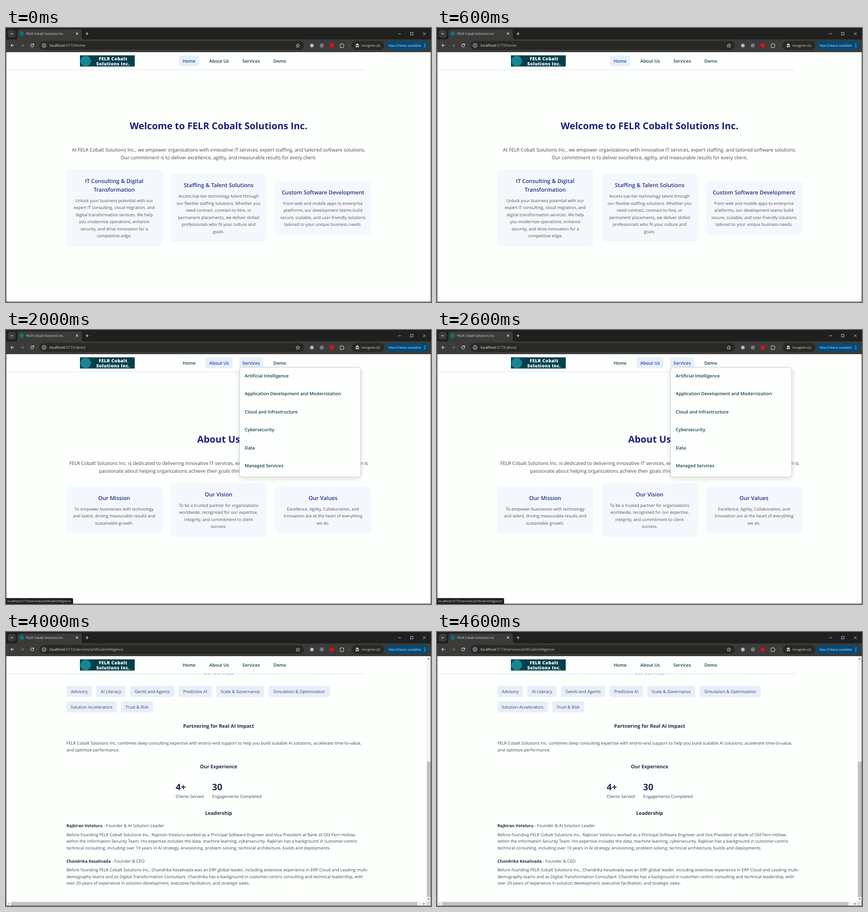
These frames come from a looping animation (931x601 px, 5 s). An HTML page with a canvas:

```html
<!DOCTYPE html>
<html lang="en">
<head>
<meta charset="utf-8">
<title>Site tour</title>
<style>
html, body { margin: 0; width: 100%; height: 100%; overflow: hidden; background: #fdfefd; }
canvas { display: block; width: 931px; height: 601px; }
</style>
</head>
<body>
<canvas id="stage"></canvas>
<script>
const W = 931, H = 601, STEP = 1000, SCENES = 5;
const FONT = '"Open Sans", "Noto Sans", sans-serif';
const BRAND = 'FELR Cobalt Solutions Inc.';
const INDIGO = '#1a1f7c', NAVY = '#1b2d45', BODY = '#444748', PAGE = '#fdfffd';
const MID = 465.7, SCROLL = 402;

const canvas = document.getElementById('stage');
const ctx = canvas.getContext('2d');
const dpr = window.devicePixelRatio || 1;
canvas.width = W * dpr;
canvas.height = H * dpr;

// Text is placed by the middle of its capitals; returns its width.
function text(str, x, y, size, color, { weight = 400, align = 'left', spacing = 0 } = {}) {
  ctx.font = `${weight} ${size}px ${FONT}`;
  ctx.textAlign = align;
  ctx.letterSpacing = spacing + 'px';
  ctx.fillStyle = color;
  ctx.fillText(str, x, y + size * 0.36);
  return ctx.measureText(str).width;
}

const centered = (str, x, y, size, color, weight) =>
  text(str, x, y, size, color, { weight, align: 'center' });

function lines(list, x, y, gap, size, color, align) {
  list.forEach((s, i) => text(s, x, y + i * gap, size, color, { align }));
}

function rect(x, y, w, h, color) {
  ctx.fillStyle = color;
  ctx.fillRect(x, y, w, h);
}

function round(x, y, w, h, r, color) {
  ctx.beginPath();
  ctx.roundRect(x, y, w, h, r);
  ctx.fillStyle = color;
  ctx.fill();
}

function disc(x, y, r, color) {
  ctx.beginPath();
  ctx.arc(x, y, r, 0, Math.PI * 2);
  ctx.fillStyle = color;
  ctx.fill();
}

function stroke(d, color, width = 1) {
  ctx.strokeStyle = color;
  ctx.lineWidth = width;
  ctx.stroke(new Path2D(d));
}

function shape(d, color) {
  ctx.fillStyle = color;
  ctx.fill(new Path2D(d));
}

function drawBrowser(path) {
  const light = '#dfe0dd';
  rect(0, 0, W, 53, '#20211f');
  rect(0, 25, W, 28, '#3b3c39');
  round(4, 4, 17, 17, 5, '#3b3c39');
  stroke('M10 11.3l2.5 2.5 2.5-2.5', light, 1.1);
  shape('M20 25q5 0 5-5V8q0-5 5-5h131q5 0 5 5v12q0 5 5 5z', '#3b3c39');
  disc(34.5, 12.5, 5, '#0e7080');
  text(BRAND, 44, 12.6, 6.95, light);
  stroke('M153.3 10l4.6 4.6m0-4.6l-4.6 4.6', light, 1.1);
  stroke('M174.2 12.5h6.8m-3.4-3.4v6.8', light, 1.1);
  stroke('M859 12.7h6M886 9.7h5.6v5.6h-5.6zM913.4 9.6l6 6m0-6l-6 6', light, 0.9);

  stroke('M17.8 38.3h-7m3.2-3.3l-3.3 3.3 3.3 3.3', light, 1.1);
  stroke('M32 38.3h7m-3.2-3.3l3.3 3.3-3.3 3.3', '#777875', 1.1);
  stroke('M60.3 36.6a3.3 3.3 0 1 0 .2 2.6M60.8 34.6v2.5h-2.5', light, 1.1);

  round(73, 28.5, 580, 19.5, 9.7, '#282927');
  disc(83.3, 38.3, 6.8, '#3b3c39');
  stroke('M79.5 38.3a3.8 3.8 0 1 0 7.6 0a3.8 3.8 0 1 0-7.6 0M83.3 37.8v2.5M83.3 36v1', light, 0.9);
  const host = text('localhost', 95.5, 38.3, 8, '#f2f3f0');
  text(':5173/' + path, 95.5 + host, 38.3, 8, '#c3c5c1');
  stroke('M639.3 34.4l1.2 2.8 3 .2-2.3 2 .8 3-2.7-1.7-2.7 1.7.8-3-2.3-2 3-.2z', light, 0.9);

  disc(670, 38.4, 4, '#9fc0cf');
  disc(691.8, 38.4, 4.6, '#777875');
  disc(713.5, 38.4, 4.8, '#e40d12');
  stroke('M731.8 35.3h2.4a1.3 1.3 0 0 1 2.6 0h2.4v2.5a1.3 1.3 0 0 1 0 2.6v2.3h-7.4v-2.4a1.4 1.4 0 0 0 0-2.6z', light, 1);
  rect(751, 34, 1, 9, '#5d5e5b');

  round(757, 28.5, 72, 19.5, 9.7, '#282927');
  shape('M766.8 37.2l1-3h3.6l1 3z', light);
  stroke('M765 37.8h9.2M769 40.6h1.2', light, 0.9);
  disc(767.6, 40.8, 1.6, light);
  disc(771.6, 40.8, 1.6, light);
  text('Incognito (2)', 778.7, 38.4, 7.1, light);

  round(832, 28.5, 94.5, 19.5, 9.7, '#064a75');
  text('New Orbeno available', 838, 38.4, 6.9, '#cfe8fa');
  for (let i = -1; i <= 1; i++) disc(917.5, 38.3 + i * 3.1, 0.9, '#cfe8fa');
}

const NAV = [
  ['Home', 401, 379, 44],
  ['About Us', 466.7, 437, 59],
  ['Services', 537, 511, 52.5],
  ['Demo', 599.8, 578, 44]
];

function drawNav(active) {
  rect(1, 53, 784, 39, PAGE);
  rect(1, 91.5, 784, 1, '#dfe2e2');
  rect(784.5, 53, 0.7, 39, '#f5f7f7');
  rect(162, 60, 120, 24.5, '#03404c');
  disc(174.5, 72.3, 11.5, '#178592');
  const [a, b, ...rest] = BRAND.split(' ');
  const mark = { weight: 800, align: 'center', spacing: 0.4 };
  text(a + ' ' + b, 234.5, 67.4, 9.8, '#fff', mark);
  text(rest.join(' '), 234.5, 78.8, 9.8, '#fff', mark);
  for (const [name, x, left, width] of NAV) {
    const on = active.includes(name);
    if (on) round(left, 60.3, width, 23, 4, '#e8eefa');
    centered(name, x, 72.6, 9.75, on ? '#1b4fa8' : '#123f50', 600);
  }
}

function drawMenu() {
  const items = ['Artificial Intelligence', 'Application Development and Modernization',
    'Cloud and Infrastructure', 'Cybersecurity', 'Data', 'Managed Services'];
  ctx.save();
  ctx.shadowColor = 'rgba(0,0,0,.14)';
  ctx.shadowBlur = 12 * dpr;
  ctx.shadowOffsetY = 3 * dpr;
  round(511.5, 82, 265.5, 240.5, 6, PAGE);
  ctx.restore();
  ctx.beginPath();
  ctx.roundRect(511.5, 82, 265.5, 240.5, 6);
  ctx.strokeStyle = '#c3c7c9';
  ctx.lineWidth = 0.9;
  ctx.stroke();
  items.forEach((s, i) => text(s, 523, 100.2 + i * 39.5, 9.75, '#123f50', { weight: 600 }));
}

function drawCard(i, heads, body) {
  const hGap = 18.7, pGap = 15.55;
  const x = 237 + i * 228.7;
  const h = 37.2 + heads.length * hGap + body.length * pGap;
  const top = 394.7 - h / 2;
  round(x - 105, top, 210.4, h, 7, '#f4f8fc');
  heads.forEach((s, k) => centered(s, x, top + 25 + k * hGap, 12.05, '#253089', 600));
  lines(body, x, top + 48.8 + (heads.length - 1) * hGap, pGap, 9.2, '#505456', 'center');
}

function drawHome() {
  centered('Welcome to ' + BRAND, MID, 214.8, 20.6, INDIGO, 700);
  lines([`At ${BRAND}, we empower organizations with innovative IT services, expert staffing, and tailored software solutions.`,
    'Our commitment is to deliver excellence, agility, and measurable results for every client.'],
    MID, 267.2, 16.6, 10.52, BODY, 'center');
  drawCard(0, ['IT Consulting & Digital', 'Transformation'],
    ['Unlock your business potential with our', 'expert IT consulting, cloud migration, and',
      'digital transformation services. We help', 'you modernize operations, enhance',
      'security, and drive innovation for a', 'competitive edge.']);
  drawCard(1, ['Staffing & Talent Solutions'],
    ['Access top-tier technology talent through', 'our flexible staffing solutions. Whether you',
      'need contract, contract-to-hire, or', 'permanent placements, we deliver skilled',
      'professionals who fit your culture and', 'goals.']);
  drawCard(2, ['Custom Software Development'],
    ['From web and mobile apps to enterprise', 'platforms, our development teams build',
      'secure, scalable, and user-friendly solutions', 'tailored to your unique business needs.']);
}

function drawAbout() {
  centered('About Us', MID, 239.3, 20.7, INDIGO, 700);
  lines([`${BRAND} is dedicated to delivering innovative IT services, expert staffing, and custom software solutions. Our team is`,
    'passionate about helping organizations achieve their goals through technology, talent, and transformation.'],
    MID, 292, 17, 10.56, BODY, 'center');
  drawCard(0, ['Our Mission'], ['To empower businesses with technology',
    'and talent, driving measurable results and', 'sustainable growth.']);
  drawCard(1, ['Our Vision'], ['To be a trusted partner for organizations',
    'worldwide, recognized for our expertise,', 'integrity, and commitment to client', 'success.']);
  drawCard(2, ['Our Values'], ['Excellence, Agility, Collaboration, and',
    'Innovation are at the heart of everything', 'we do.']);
}

const TOPICS = [
  ['AI That Works for You', 293, 237,
    ['Support build-vs-buy decisions, team growth, and architecture through',
      'focused advisory, training, and enterprise AI readiness—empowering your',
      'organization to lead with clarity and confidence in intelligent application', 'development.']],
  ['Strengthen Your AI Foundation', 638.5, 237,
    ['AI success begins with a foundation tailored to your current state. Ovel',
      'unifies cloud, data, and apps, while upskilling teams and embedding',
      'scalable governance. Enable enterprise technical readiness across',
      'development, testing, and production—aligning with your goals for scale,', 'trust, and risk.']],
  ['Scale AI with Purpose-Built Tools', 293, 356.3,
    ['Ready to move faster? We offer customizable, prebuilt solution',
      'accelerators—from GenAI agents to simulation and optimization tools. We',
      'also help you design agents that go beyond automation, built for',
      'reasoning, and real business impact.']],
  ['Partnering for Real AI Impact', 638.5, 356.3,
    ['We combine deep consulting expertise with end-to-end support to help',
      'you build scalable AI solutions, accelerate time-to-value, and optimize',
      'performance. Our approach integrates seamlessly across cloud, data, and',
      'application tools—ensuring your AI initiatives are aligned, efficient, and', 'built to last.']]
];

const CHIPS = [
  ['Advisory', 132.5, 56, 0], ['AI Literacy', 198, 64, 0], ['GenAI and Agents', 271.7, 96.8, 0],
  ['Predictive AI', 378, 73, 0], ['Scale & Governance', 460.7, 105, 0],
  ['Simulation & Optimization', 575.5, 133.5, 0],
  ['Solution Accelerators', 132.5, 110, 1], ['Trust & Risk', 252, 70, 1]
];

const LEADERS = [
  ['Rajkiran Voteluru', ' - Founder & AI Solution Leader', 827,
    [`Before founding ${BRAND}, Rajkiran Voteluru worked as a Principal Software Engineer and Vice President at Bank of Old Fern Hollow,`,
      'within the Information Security Team. His expertise includes the data, machine learning, cybersecurity. Rajkiran has a background in customer-centric',
      'technical consulting, including over 10 years in AI strategy, envisioning, problem solving, technical architecture, builds and deployments.']],
  ['Chandrika Kesalivada', ' - Founder & CEO', 904.4,
    [`Before founding ${BRAND}, Chandrika Kesalivada was an ERP global leader, including extensive experience in ERP Cloud and Leading multi-`,
      'demography teams and as Digital Transformation Consultant. Chandrika has a background in customer-centric consulting and technical leadership, with',
      'over 20 years of experience in solution development, executive facilitation, and strategic sales.']]
];

function drawAI(scroll) {
  const left = 132.4, slate = '#35485a';
  const head = (s, y) => centered(s, MID, y, 10.7, NAVY, 700);
  ctx.save();
  ctx.translate(0, -scroll);
  centered('AI That Meets You Where You Are', MID, 176.3, 29.6, NAVY, 700);
  for (const [title, x, y, body] of TOPICS) {
    centered(title, x, y, 11.1, '#253089', 600);
    lines(body, x, y + 21.2, 15.55, 9.18, '#505456', 'center');
  }
  head('Our Services', 491.6);
  for (const [label, x, w, row] of CHIPS) {
    const y = 520.3 + row * 34;
    round(x, y, w, 24.3, 3.5, '#e8eef9');
    centered(label, x + w / 2, y + 12.4, 9.28, slate);
  }
  head('Partnering for Real AI Impact', 608.6);
  lines([`${BRAND} combines deep consulting expertise with end-to-end support to help you build scalable AI solutions, accelerate time-to-value,`,
    'and optimize performance.'], left, 645.6, 14.7, 9.2, slate);
  head('Our Experience', 697);
  [['4+', 'Clients Served', 371.8], ['30', 'Engagements Completed', 451.5]].forEach(([n, label, x]) => {
    text(n, x, 741.6, 19.5, NAVY, { weight: 700 });
    text(label, x, 763, 9.3, slate);
  });
  head('Leadership', 799.6);
  for (const [name, role, y, body] of LEADERS) {
    const w = text(name, left, y, 8.97, NAVY, { weight: 700 });
    text(role, left + w, y, 9.3, slate);
    lines(body, left, y + 19.2, 14.7, 9.2, slate);
  }
  ctx.restore();
}

function drawBars(thumb) {
  const grey = '#c1c2c1', mark = '#555';
  rect(921, 53, 9, 538.5, '#f1f2f1');
  rect(922, thumb, 8, 296.5, grey);
  shape('M923.5 60l2.2-2.8 2.2 2.8z', mark);
  shape('M923.5 584.5l2.2 2.8 2.2-2.8z', mark);
  rect(1, 591.5, 920, 9, '#f1f2f1');
  rect(11, 592.3, 890, 7.7, grey);
  shape('M7 594l-2.8 2.2 2.8 2.2z', '#a0a1a0');
  shape('M914.3 594l2.8 2.2-2.8 2.2z', mark);
  rect(921, 591.5, 9, 9, '#dcdddc');
}

function drawStatus(url, width) {
  round(0, 588, width, 13, [0, 3, 0, 0], '#20211f');
  text(url, 3, 594.7, 6.9, '#dcdddb');
}

function frameEdge() {
  rect(0, 53, 0.8, 548, '#3a3b39');
  rect(930.2, 53, 0.8, 548, '#3a3b39');
  rect(0, 600.2, W, 0.8, '#3a3b39');
}

function draw(scene) {
  ctx.setTransform(dpr, 0, 0, dpr, 0, 0);
  ctx.textRendering = 'geometricPrecision';
  rect(0, 0, W, H, PAGE);
  const ai = scene > 2;
  if (ai) drawAI(scene === 4 ? SCROLL : 0);
  else if (scene) drawAbout();
  else drawHome();

  drawNav([['Home'], ['About Us'], ['About Us', 'Services'], [], []][scene]);
  if (scene === 2) drawMenu();
  if (ai) drawBars(scene === 4 ? 284.5 : 63);
  drawBrowser(ai ? 'services/artificialintelligence' : scene ? 'about' : 'home');
  frameEdge();
  if (scene === 1) drawStatus('localhost:5173/about', 75.5);
  if (scene === 2) drawStatus('localhost:5173/services/artificialintelligence', 147);
}

let shown = -1;
function tick(now) {
  const scene = Math.floor(now / STEP) % SCENES;
  if (scene !== shown) draw(shown = scene);
  requestAnimationFrame(tick);
}
draw(shown = 0);
requestAnimationFrame(tick);
</script>
</body>
</html>
```
